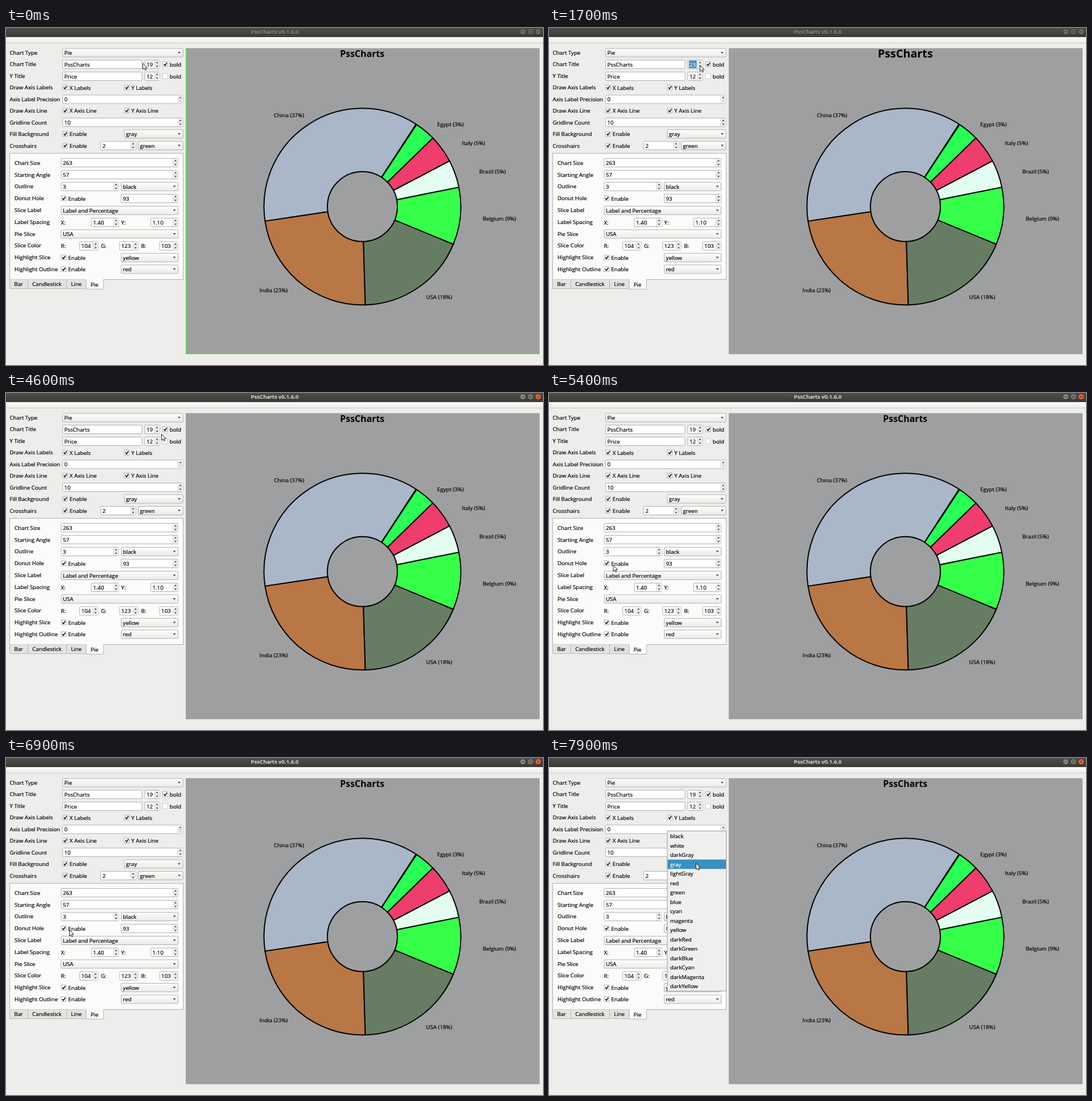
Recreate the animation shown at these times as an HTML page. Size 944 by 593 pixels, loop 8 s.

```html
<!DOCTYPE html>
<html lang="en">
<head>
<meta charset="utf-8">
<title>PssCharts</title>
<style>
  html, body { margin: 0; width: 100%; height: 100%; overflow: hidden; background: #eeedeb; }
  svg { display: block; width: 944px; height: 593px; }
  text { font: 9.7px "Open Sans", "Noto Sans", sans-serif; fill: #000; stroke: #000; stroke-width: .22; white-space: pre; }
  .caption { font-weight: 600; text-anchor: middle; fill: #8b8983; stroke: #8b8983; }
  .heading { font-weight: 700; text-anchor: middle; stroke: none; }
  .active .caption { fill: #e2dfd8; stroke: #e2dfd8; }
  .button { fill: #706e69; }
  .active .button { fill: #888680; }
  .active .close { fill: #ea6237; }
  .light { fill: #fff; stroke: #fff; }
</style>
</head>
<body>
<svg id="stage" viewBox="0 0 944 593" xmlns="http://www.w3.org/2000/svg">
  <defs>
    <linearGradient id="bar" x2="0" y2="1"><stop stop-color="#504e49"/><stop offset="1" stop-color="#3b3a36"/></linearGradient>
    <linearGradient id="face" x2="0" y2="1"><stop stop-color="#fdfdfc"/><stop offset="1" stop-color="#ebeae8"/></linearGradient>
    <linearGradient id="menu" x2="0" y2="1"><stop stop-color="#fafaf9"/><stop offset="1" stop-color="#efeeec"/></linearGradient>
  </defs>
</svg>
<script>
const stage = document.getElementById('stage');

function add(tag, attrs, parent = stage) {
  const el = document.createElementNS(stage.namespaceURI, tag);
  for (const key in attrs) el.setAttribute(key, attrs[key]);
  return parent.appendChild(el);
}
function rect(x, y, w, h, fill, more, parent) {
  return add('rect', { x, y, width: w, height: h, fill, ...more }, parent);
}
function path(d, more, parent) {
  return add('path', { d, fill: 'none', ...more }, parent);
}
// Text placed by its left edge and vertical centre.
function label(x, cy, str, cls = '', parent) {
  const el = add('text', { x, y: cy + 3.5, class: cls }, parent);
  el.textContent = str;
  return el;
}

const edge = { stroke: '#b3b1ae', rx: 1.5 };
const field = (l, r, cy, fill = '#fff') => rect(l + .5, cy - 7.5, r - l - 1, 15, fill, edge);

function input(l, r, cy, str) {
  field(l, r, cy);
  return label(l + 3.5, cy, str);
}
function combo(l, r, cy, str) {
  field(l, r, cy, 'url(#face)');
  path(`M${r - 9.5} ${cy - 1.5}h5l-2.5 3z`, { fill: '#484848' });
  label(l + 3.5, cy, str);
}
function spin(l, r, cy, str, atMin) {
  const text = input(l, r, cy, str);
  rect(r - 9.5, cy - 7, 9, 14, '#f3f2f1');
  path(`M${r - 9.5} ${cy - 7}v14M${r - 9.5} ${cy}h9`, { stroke: '#cfcdca', 'stroke-width': .8 });
  path(`M${r - 7.2} ${cy - 2.2}h4.4l-2.2 -2.8z`, { fill: '#484848' });
  path(`M${r - 7.2} ${cy + 2.2}h4.4l-2.2 2.8z`, { fill: atMin ? '#b5b5b5' : '#484848' });
  return text;
}
function check(x, cy, str, on = true) {
  const box = rect(x + .5, cy - 4.5, 8.5, 8.5, '#fff', { stroke: on ? '#b3b1ae' : '#d2d0ce' });
  const tick = path(`M${x + 2.5} ${cy - .5}l2 2.6l3.2 -4.8`, { stroke: '#111', 'stroke-width': 1.6 });
  tick.style.visibility = on ? '' : 'hidden';
  label(x + 12.8, cy, str);
  return { box, tick };
}

// Window frame
rect(0, 0, 944, 16, 'url(#bar)');
rect(0, 16, 944, 10, 'url(#menu)');
rect(0, 26, 944, 1, '#cbc9c6');
path('M3.5 18v7', { stroke: '#d5d3d0', 'stroke-dasharray': '1 1' });
label(472.5, 6.6, 'PssCharts v0.1.6.0', 'caption');
['M906.5 6.5h4', 'M920.2 4.8h3.6v3.6h-3.6z', 'M933.8 4.8l3.4 3.4m0 -3.4l-3.4 3.4'].forEach((d, i) => {
  add('circle', { cx: 908.5 + i * 13.5, cy: 6.5, r: 5, class: i == 2 ? 'button close' : 'button', stroke: '#32312d', 'stroke-width': .7 });
  path(d, { stroke: '#3b3934' });
});

// General options
['Chart Type', 'Chart Title', 'Y Title', 'Draw Axis Labels', 'Axis Label Precision',
 'Draw Axis Line', 'Gridline Count', 'Fill Background', 'Crosshairs']
  .forEach((str, i) => label(6.5, 43.5 + i * 20.45, str));
combo(99, 311.5, 43.5, 'Pie');
input(99, 239.5, 64, 'PssCharts');
const sizeText = spin(243.5, 270.5, 64, '19');
const selection = rect(246, 57.5, 13.5, 13, '#308cc6');
sizeText.before(selection);
check(275, 64, 'bold');
input(99, 239.5, 85, 'Price');
spin(243.5, 270.5, 85, '12');
check(275, 85, 'bold', false);
check(99, 105, 'X Labels');
check(207.5, 105, 'Y Labels');
spin(99, 311.5, 125.5, '0', true);
check(99, 145.5, 'X Axis Line');
check(207.5, 145.5, 'Y Axis Line');
spin(99, 311.5, 166, '10');
check(99, 186.5, 'Enable');
combo(207.5, 311.5, 186.5, 'gray');
check(99, 207, 'Enable');
spin(166, 228.5, 207, '2');
combo(232, 311.5, 207, 'green');

// Tab page
rect(6.5, 220.5, 305, 222, '#fbfbfa', { stroke: '#b3b1ae' });
['Chart Size', 'Starting Angle', 'Outline', 'Donut Hole', 'Slice Label', 'Label Spacing',
 'Pie Slice', 'Slice Color', 'Highlight Slice', 'Highlight Outline']
  .forEach((str, i) => label(15, 237.3 + i * 20.8, str));
spin(96.5, 303, 237, '263');
spin(96.5, 303, 258, '57');
spin(96.5, 198.5, 279, '3');
combo(202, 303, 279, 'black');
const donut = check(96.5, 300, 'Enable');
spin(202, 303, 300, '93');
combo(96.5, 303, 321, 'Label and Percentage');
label(96.5, 342, 'X:');
spin(149.5, 198.5, 342, '1.40');
label(202.5, 342, 'Y:');
spin(254, 303, 342, '1.10');
combo(96.5, 303, 362.5, 'USA');
[['R:', '104'], ['G:', '123'], ['B:', '103']].forEach(([name, value], i) => {
  label(96.5 + i * 70.5, 383.5, name);
  spin(129 + i * 70.3, 162.4 + i * 70.3, 383.5, value);
});
[[404, 'yellow'], [424.5, 'red']].forEach(([cy, colour]) => {
  check(96.5, cy, 'Enable');
  combo(202, 303, cy, colour);
});
[['Bar', 6.5, 38.5], ['Candlestick', 38.5, 106.5], ['Line', 106.5, 141], ['Pie', 141, 171.5]].forEach(([str, l, r]) => {
  const open = str == 'Pie';
  path(`M${l} 442.5V${open ? 459.5 : 458.5}H${r}V442.5`, { fill: open ? '#fbfbfa' : '#e4e3e1', stroke: '#b8b6b3' });
  if (open) rect(l + .5, 441.5, r - l - 1, 2, '#fbfbfa');
  label(l + 7.7, open ? 451 : 450, str);
});

// Chart
rect(316, 35.5, 622, 538.5, '#9e9fa0');
const crosshair = path('M316.7 35.5V572.9H938', { stroke: '#57d95b', 'stroke-width': 1.8 });
const heading = label(626.3, 45, 'PssCharts', 'heading');

const cx = 626.5, cy = 314.3, R = 173, HOLE = 61.5;
const ends = [57, 188.5, 271.7, 337.5, 371.4, 387.7, 404.3, 416.6];
const colours = ['#a9b7c8', '#b87744', '#677d63', '#35ff49', '#e3fdf0', '#ef3d6d', '#29ff55'];
const polar = (deg, r) => {
  const a = deg * Math.PI / 180;
  return `${cx + r * Math.cos(a)} ${cy - r * Math.sin(a)}`;
};
colours.forEach((fill, i) => {
  const [a, b] = [ends[i], ends[i + 1]];
  path(`M${cx} ${cy}L${polar(a, R)}A${R} ${R} 0 0 0 ${polar(b, R)}Z`,
    { fill, stroke: '#000', 'stroke-width': 2, 'stroke-linejoin': 'round' });
});
const hole = add('circle', { cx, cy, r: HOLE, fill: '#9e9fa0', stroke: '#000', 'stroke-width': 2 });
[['China (37%)', 471, 153], ['India (23%)', 445.5, 461], ['USA (18%)', 738.5, 473], ['Belgium (9%)', 838, 335],
 ['Brazil (5%)', 832, 252.5], ['Italy (5%)', 801.5, 202.5], ['Egypt (3%)', 758, 169]]
  .forEach(([str, x, y]) => label(x, y, str));

// Colour list
const popup = add('g', {});
rect(208, 128.5, 103.5, 281.5, '#efefee', { stroke: '#9f9e9c' }, popup);
['black', 'white', 'darkGray', 'gray', 'lightGray', 'red', 'green', 'blue', 'cyan', 'magenta', 'yellow',
 'darkRed', 'darkGreen', 'darkBlue', 'darkCyan', 'darkMagenta', 'darkYellow'].forEach((name, i) => {
  const y = 137.5 + i * 16.5, chosen = name == 'gray';
  if (chosen) rect(208.5, y - 8.3, 102.5, 16.5, '#3a8fc3', {}, popup);
  label(213, y, name, chosen ? 'light' : '', popup);
});

const pointer = path('M.5 .5V11.2L3 8.9L4.7 12.6L6.4 11.8L4.8 8.2H8.1Z',
  { fill: '#fff', stroke: '#111', 'stroke-width': .9 });

// Pointer stops: time, x, y
const stops = [
  [0, 240, 61.5], [100, 240, 61], [400, 240, 61], [500, 240, 62], [600, 240, 62], [900, 264, 66],
  [1000, 264, 66], [1200, 265, 65], [2200, 265, 65], [2400, 262, 64], [2900, 264, 64], [3100, 286, 67],
  [3400, 284, 67], [3900, 284, 67], [4000, 283, 67], [4200, 283, 67], [4300, 282, 66], [4500, 282, 66],
  [4600, 273, 72], [5400, 112.5, 302.5], [6500, 112.5, 302.5], [6600, 111, 302], [6900, 111, 302], [7700, 258, 185]
];
function pointerAt(t) {
  const i = stops.findIndex(s => s[0] > t);
  if (i < 0) return stops[stops.length - 1].slice(1);
  const [t0, x0, y0] = stops[i - 1], [t1, x1, y1] = stops[i];
  let k = (t - t0) / (t1 - t0);
  if (t1 - t0 > 300) k = k * k * (3 - 2 * k);
  return [x0 + (x1 - x0) * k, y0 + (y1 - y0) * k];
}
function sizeAt(t) {
  if (t < 1400 || t >= 3000) return 19;
  return t < 2900 ? Math.min(23, 20 + (t - 1400) / 100) : 21;
}
const show = (el, on) => { el.style.visibility = on ? 'visible' : 'hidden'; };
const within = (t, a, b) => t >= a && t < b;

function draw(now) {
  const t = Math.floor(now % 8000 / 100) * 100;
  const size = sizeAt(t), px = 15.9 + (size - 19) * .96;
  const selected = within(t, 1400, 3400), full = within(t, 5600, 6000);

  stage.classList.toggle('active', t >= 3400);
  show(crosshair, t < 1400);
  show(selection, selected);
  sizeText.textContent = size;
  sizeText.classList.toggle('light', selected);
  heading.style.fontSize = px + 'px';
  heading.setAttribute('y', 45.3 + px * .36);

  show(hole, !full);
  show(donut.tick, !full);
  donut.box.setAttribute('fill', t == 5500 || within(t, 5800, 6000) ? '#d3d2d0' : '#fff');
  show(popup, t >= 7800);
  pointer.setAttribute('transform', `translate(${pointerAt(t)})`);
  requestAnimationFrame(loop);
}
const start = performance.now();
const loop = () => draw(performance.now() - start);
loop();
</script>
</body>
</html>
```
